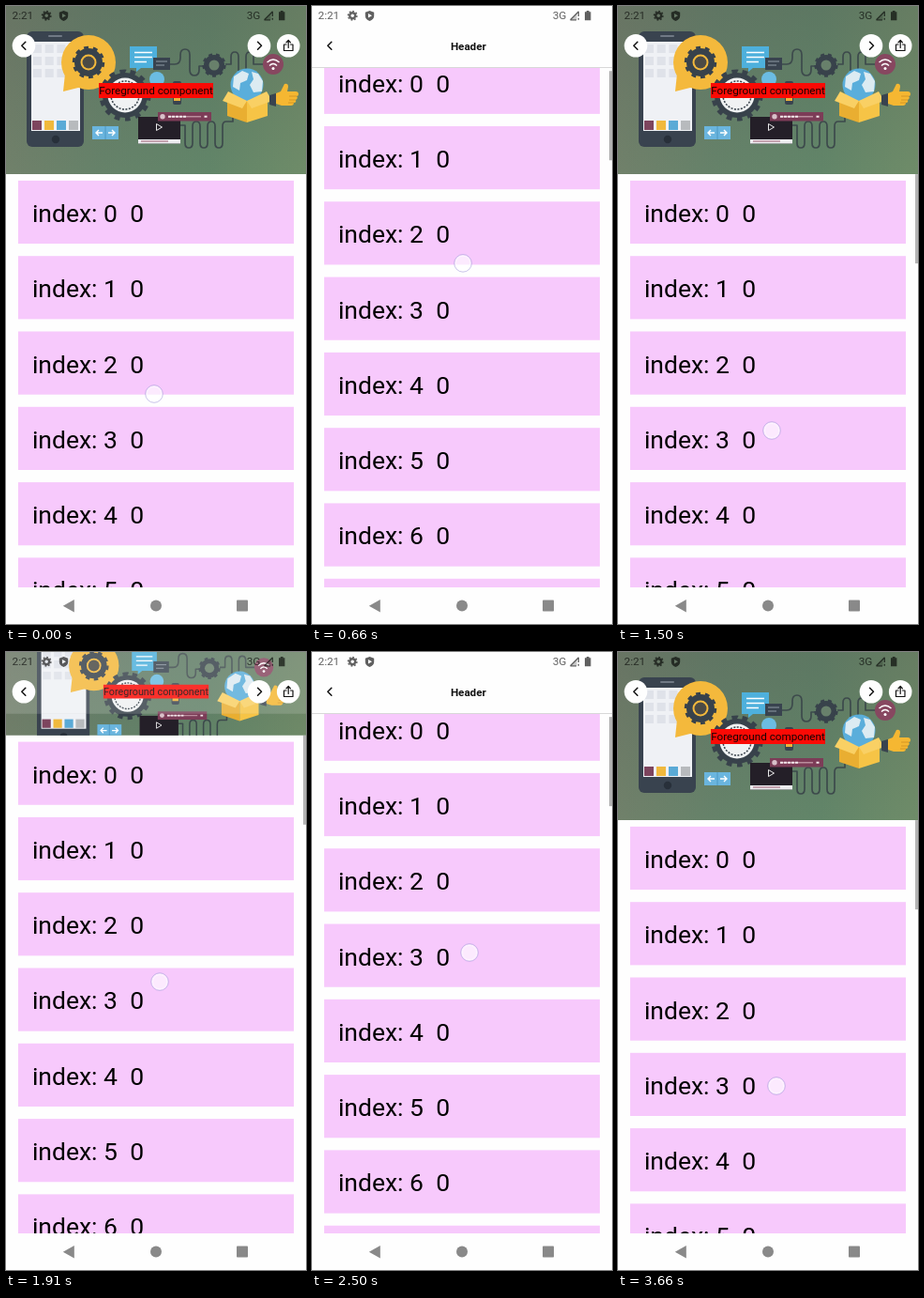
These frames come from a looping animation (320 by 658 pixels, 3990 ms). An HTML page:

```html
<!DOCTYPE html>
<html lang="en">
<head>
<meta charset="utf-8">
<title>Collapsing header</title>
<style>
  html, body { margin: 0; width: 100%; height: 100%; overflow: hidden; background: #fefefe; }
  svg { display: block; width: 320px; height: 658px; font-family: Roboto, sans-serif; }
  .row { font-size: 26.5px; white-space: pre; }
  .wire { fill: none; stroke: #3d4a4c; stroke-width: 1.7; stroke-linejoin: round; }
  .white { fill: none; stroke: #fff; stroke-width: 1.4; }
  .icon { fill: none; stroke: #111; stroke-width: 1.5; stroke-linecap: round; stroke-linejoin: round; }
</style>
</head>
<body>
<svg viewBox="0 0 320 658" xmlns="http://www.w3.org/2000/svg">
  <defs>
    <linearGradient id="wall">
      <stop offset="0" stop-color="#74816b"/>
      <stop offset=".35" stop-color="#66836a"/>
      <stop offset=".65" stop-color="#628669"/>
      <stop offset="1" stop-color="#738f69"/>
    </linearGradient>
    <linearGradient id="shade" x1="0" y1="0" x2="0" y2="1">
      <stop offset="0" stop-color="#4c4a4c" stop-opacity=".25"/>
      <stop offset="1" stop-color="#4c4a4c" stop-opacity="0"/>
    </linearGradient>
    <clipPath id="clip"><rect id="clipBox" width="320" height="179"/></clipPath>
  </defs>
  <rect width="320" height="658" fill="#fefefe"/>
  <g id="list"></g>
  <rect id="bar" x="317" width="3" height="95" fill="#b4b4b4"/>

  <g clip-path="url(#clip)">
    <g id="art">
      <rect x="-30" y="-10" width="380" height="200" fill="url(#wall)"/>
      <rect x="-30" y="-10" width="380" height="200" fill="url(#shade)"/>
      <g class="wire">
        <path d="M172 62h8q6 0 6-7v-3q0-6 5-6t5 6v16q0 6 5 6t5-6v-4h8M234 62h6v-8q0-5 4-5t4 5v14q0 5 4 5t4-5V54q0-5 4-5t4 5v8h12"/>
        <path d="M186 127h5v19q0 5 4 5t4-5v-18q0-5 4-5t4 5v18q0 5 4 5t4-5v-18q0-5 4-5t4 5v18q0 5 4 5t4-5v-18q0-5 4-5h7v-11"/>
        <path d="M150 96h20v-12h10"/>
      </g>
      <rect x="22" y="27" width="61" height="123" rx="6" fill="#39434f"/>
      <rect x="27" y="38" width="52" height="95" fill="#eff1f5"/>
      <circle cx="53" cy="142" r="4.2" fill="#28303a"/>
      <rect x="45" y="31" width="15" height="2" rx="1" fill="#707985"/>
      <g id="apps"></g>
      <path d="M63 72l-2 19 20-5z" fill="#f4b93c"/>
      <circle cx="88" cy="60" r="29" fill="#f4b93c"/>
      <g id="gears"></g>
      <path d="M132 43h29v23h-17l-5 4v-4h-7z" fill="#4eb0dc"/>
      <path class="white" d="M137 49.500h19M137 54.500h19M137 59.500h13"/>
      <rect x="157" y="55" width="18" height="13" fill="#39434f"/>
      <path d="M160 59h12M160 63h9" stroke="#8d99a3"/>
      <circle cx="161" cy="78" r="8" fill="#6bbce2"/>
      <rect x="178" y="80" width="9" height="25" rx="2" fill="#39434f"/>
      <rect x="179" y="95" width="7" height="6" fill="#e9b23b"/>
      <circle cx="285" cy="62" r="11" fill="#874760"/>
      <path class="white" d="M278.500 60q6.500-6 13 0M281 63.500q4-4 8 0"/>
      <circle cx="285" cy="66.500" r="1.500" fill="#fff"/>
      <circle cx="257" cy="84" r="17.500" fill="#5aaedb"/>
      <path d="M243 75l9-6 7 3-2 7-7 3-1 8-7-4zM262 70l7 2 5 8-1 11-9 1-4-8 4-6z" fill="#dcebf2"/>
      <path d="M236 95l21 6v23l-21-7z" fill="#e9ae31"/>
      <path d="M257 101l22-6v22l-22 7z" fill="#f6c446"/>
      <path d="M237 91l20 10-5 8-21-8z" fill="#f9d064"/>
      <path d="M278 91l-21 10 5 8 22-8z" fill="#f9d064"/>
      <path d="M281 95l7-2v14l-7-2z" fill="#39434f"/>
      <path d="M288 93l5-2 4-8q4-1 4 3l-1 5h9q3 0 3 3 0 2-2 2 2 2-1 4 1 3-2 3 0 3-3 3h-10l-6-2z" fill="#f5b732"/>
      <path d="M302 96h8M302 100h7M301 103h6" stroke="#cf8e20" stroke-width=".8"/>
      <rect x="141" y="118" width="45" height="28.500" fill="#241f28"/>
      <rect x="141" y="142" width="45" height="4.500" fill="#ececef"/>
      <path d="M144 144h29" stroke="#9c5a70"/>
      <path class="white" d="M160.500 125.500v7l6-3.500z" style="stroke-width:.9"/>
      <rect x="162" y="113" width="57" height="9.500" fill="#7c3c57"/>
      <circle cx="167" cy="117.700" r="2.700" fill="#d9c0c9"/>
      <path d="M173 117.700h35" stroke="#b98c9c" stroke-width="1.500"/>
      <path d="M173 117.700h19M211.500 117.700h4" stroke="#f0e4e8" stroke-width="2" stroke-dasharray="3 1"/>
      <rect x="92" y="128" width="28" height="14" fill="#6ab5de"/>
      <path d="M106 128v14" stroke="#4d98c4"/>
      <path class="white" d="M103 135h-7m3-3-3 3 3 3M109 135h7m-3-3 3 3-3 3"/>
      <rect x="99" y="82" width="122" height="16" fill="#fb0a05"/>
      <text x="160" y="94.300" text-anchor="middle" font-size="11.700" fill="#160303">Foreground component</text>
    </g>
  </g>

  <g id="head">
    <rect width="320" height="66" fill="#fefefe"/>
    <path d="M0 65.500h320" stroke="#d8d8d8"/>
  </g>
  <text id="title" x="166.800" y="46.800" text-anchor="middle" font-size="11.600" font-weight="700" fill="#111">Header</text>
  <circle cx="19" cy="42.300" r="12.300" fill="#fefefe"/>
  <path class="icon" d="M20.800 38.300l-4 4 4 4"/>
  <g id="actions">
    <circle cx="270" cy="42.300" r="12.300" fill="#fefefe"/>
    <circle cx="301.200" cy="42.300" r="12.300" fill="#fefefe"/>
    <path class="icon" d="M268.500 38.300l4 4-4 4"/>
    <path class="icon" style="stroke-width:1.200" d="M299 41h-2.500v6.500h9.500V41h-2.500M301.200 44.500v-8m-2.300 2.300 2.300-2.300 2.300 2.300"/>
  </g>

  <g fill="#000" opacity=".62">
    <text x="6.500" y="14.300" font-size="11.800">2:21</text>
    <circle cx="43.200" cy="10.200" r="3" fill="none" stroke="#000" stroke-width="2.400"/>
    <circle cx="43.200" cy="10.200" r="4.700" fill="none" stroke="#000" stroke-width="1.500" pathLength="16" stroke-dasharray="1"/>
    <path fill-rule="evenodd" d="M61.500 5l4.700 1.800v3.700q0 3.500-4.700 5.500-4.700-2-4.700-5.500V6.800zM60 8v4.500l4-2.200z"/>
    <text x="256.700" y="14.300" font-size="11.800">3G</text>
    <path d="M275.500 14.800l7-7v7z" fill-opacity=".35"/>
    <path d="M275.500 14.800l9-9M275.500 14.800h6.500M284.300 6v5M284.300 12.800v2" fill="none" stroke="#000" stroke-width="1.300"/>
    <path d="M291 6.200h1.800V5h2.800v1.200h1.800v9H291z"/>
  </g>

  <rect y="619" width="320" height="39" fill="#fefefe"/>
  <g fill="#898989">
    <path d="M72.800 632v13.500l-12-6.700z"/>
    <circle cx="160" cy="638.500" r="6"/>
    <rect x="246" y="632.500" width="12" height="12" rx=".8"/>
  </g>
  <g id="touch">
    <circle r="9.300" fill="#fff" fill-opacity=".62" stroke="#9d93d8" stroke-opacity=".55" stroke-width="1"/>
    <circle r="7.600" fill="none" stroke="#fff" stroke-opacity=".5"/>
  </g>
</svg>
<script>
const $ = id => document.getElementById(id);
const LOOP = 3990, STEP = 1000 / 12, FULL = 179.1, BAR = 66, TRAVEL = FULL - BAR;
const clamp = v => Math.max(0, Math.min(1, v));

function build() {
  let rows = '';
  for (let i = 0; i < 10; i++) {
    const y = 185.9 + i * 80.3;
    rows += `<rect x="13" y="${y}" width="294" height="67.200" fill="#f7c9fc"/>
      <text class="row" x="27.900" y="${y + 44}">index: ${i}  0</text>`;
  }
  $('list').innerHTML = rows;

  const box = (x, y, size, fill) => `<rect x="${x}" y="${y}" width="${size}" height="${size}" fill="${fill}"/>`;
  let apps = '';
  for (let i = 0; i < 12; i++) apps += box(29 + i % 4 * 12.7, 41 + Math.floor(i / 4) * 13, 9, '#dfe2e9');
  ['#7d455e', '#f0b93d', '#5aaad6', '#b7babd'].forEach((c, i) => apps += box(28 + i * 13, 122, 10, c));
  $('apps').innerHTML = apps;

  const gear = (x, y, r, hole, inner, teeth) => `<g transform="translate(${x} ${y})">
    <circle r="${r}" fill="#38424b"/>
    <circle r="${r}" fill="none" stroke="#38424b" stroke-width="${r * .3}" pathLength="${teeth * 2}" stroke-dasharray="1"/>
    <circle r="${hole}" fill="${inner}"/></g>`;
  $('gears').innerHTML = gear(88, 60, 15, 8.5, '#f4b93c', 10) +
    '<circle cx="88" cy="60" r="6.500" fill="#4b4a45"/>' +
    gear(127, 95, 24, 18.5, '#f0f2f3', 14) +
    '<circle cx="127" cy="95" r="15" fill="none" stroke="#38424b" stroke-width="1.500" stroke-dasharray="2 1.500"/>' +
    gear(222, 63, 11, 5.5, '#68806b', 9);
}

// One drag up and back down
function swing(t, start, length, peak) {
  const u = clamp((t - start) / length);
  return peak * Math.pow(Math.max(0, Math.sin(Math.PI * u)), 1.42);
}

// Finger path: time, x, y
const path = [
  [83, 158, 413], [417, 159, 322], [790, 162, 265], [1000, 163, 294],
  [1450, 164, 452], [1600, 164, 452], [1917, 164, 351], [2270, 167, 285],
  [2500, 168, 320], [2917, 168.5, 453], [3200, 169, 461.5], [3667, 169, 462]
];

function slope(i, k) {
  const a = path[i - 1], b = path[i], c = path[i + 1];
  if (!a || !c || (b[k] - a[k]) * (c[k] - b[k]) <= 0) return 0;
  return (c[k] - a[k]) / (c[0] - a[0]);
}

function finger(t, k) {
  if (t <= path[0][0]) return path[0][k];
  const i = path.findIndex(p => p[0] >= t);
  if (i < 0) return path[path.length - 1][k];
  const a = path[i - 1], b = path[i], d = b[0] - a[0], u = (t - a[0]) / d, v = 1 - u;
  return a[k] * (1 + 2 * u) * v * v + b[k] * u * u * (3 - 2 * u) +
    d * u * v * (v * slope(i - 1, k) - u * slope(i, k));
}

function draw(ms) {
  const tick = Math.floor((ms % LOOP + 7) / STEP), t = tick * STEP;
  const s = swing(t, 150, 1300, 149) + swing(t, 1640, 1270, 173.2);
  const height = Math.max(BAR, FULL - s), part = clamp(s / TRAVEL);
  const fade = clamp((s - 86) / 28);

  $('list').setAttribute('transform', `translate(0 ${-s})`);
  $('clipBox').setAttribute('height', height);
  $('art').setAttribute('transform',
    `translate(160 ${90 - .53 * Math.min(s, TRAVEL)}) scale(${1 - .1 * part}) translate(-160 -90)`);
  $('head').setAttribute('opacity', fade);
  $('title').setAttribute('opacity', clamp(fade * 2 - 1));
  $('actions').setAttribute('opacity', clamp(2 - 2 * fade));
  $('bar').setAttribute('y', height + Math.max(0, s - TRAVEL) * .13);
  $('bar').setAttribute('opacity', tick < 2 ? 0 : 1);
  $('touch').setAttribute('transform', `translate(${finger(t, 1)} ${finger(t, 2)})`);
}

build();
const begin = performance.now();
function loop() {
  draw(performance.now() - begin);
  requestAnimationFrame(loop);
}
loop();
</script>
</body>
</html>
```
